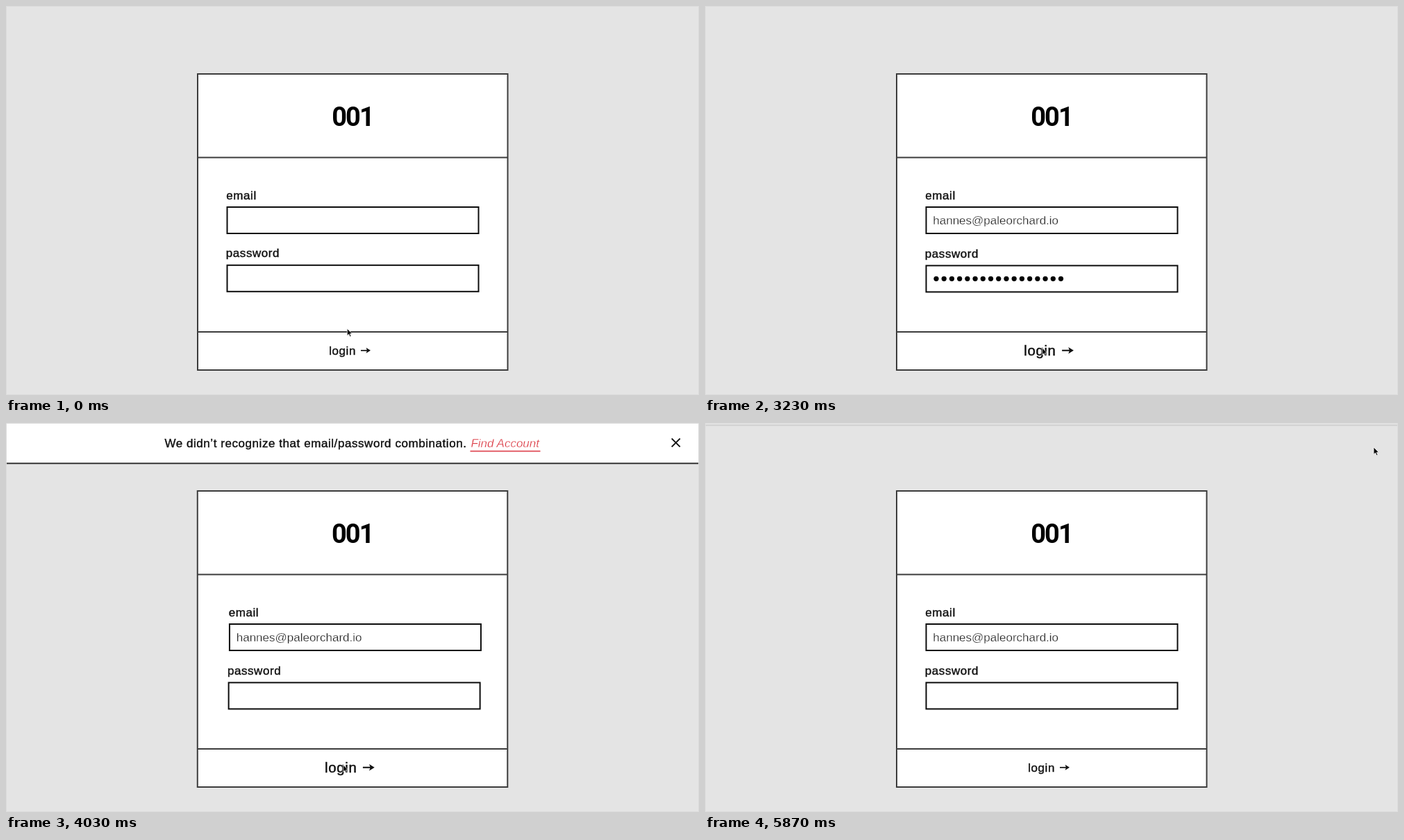
These frames come from a looping animation (998x561 px, 7.26 s). An HTML page:

```html
<!DOCTYPE html>
<html lang="en">
<head>
<meta charset="utf-8">
<title>Login form</title>
<style>
  html, body { margin: 0; width: 100%; height: 100%; overflow: hidden; background: #e4e4e4; }
  svg { display: block; width: 998px; height: 561px; }
  text { font: 17px 'Liberation Sans', Arial, sans-serif; white-space: pre; }
  .medium { fill: #111; stroke: #111; stroke-width: .4px; letter-spacing: .56px; }
  /* a white outline over the fill thins the letters */
  .light { fill: #222; stroke: #fff; stroke-width: .3px; }
  .link { fill: #dc3c46; font-style: italic; }
  .title { font: 700 38px Roboto, 'Liberation Sans', sans-serif; letter-spacing: -2px; }
  .card { fill: #fff; stroke: #3c3c3c; stroke-width: 2; }
  .field { fill: #fff; stroke: #0c0c0c; stroke-width: 2; }
</style>
</head>
<body>
<svg viewBox="0 0 998 561">
  <rect width="998" height="561" fill="#e4e4e4"/>

  <g id="card">
    <rect class="card" x="276" y="98" width="446.5" height="427"/>
    <path class="card" d="M276 218.4H722M276 469.9H722"/>
    <text class="title" x="469.3" y="172.7">001</text>
    <g id="login">
      <text class="medium" x="465.2" y="502.8">login</text>
      <path d="M511 496.8H521" stroke="#111" stroke-width="1.7"/>
      <path d="M518.6 492.8L525 496.8L518.6 500.8L520 496.8Z" fill="#111"/>
    </g>
  </g>

  <g id="email">
    <text class="medium" x="317.3" y="278.7">email</text>
    <rect class="field" x="318.5" y="290" width="362" height="38"/>
    <text id="address" class="light" x="328.3" y="315.4">hannes@paleorchard.io</text>
  </g>

  <g id="password">
    <text class="medium" x="316.8" y="362.9">password</text>
    <rect class="field" x="318.5" y="374.4" width="362" height="38"/>
    <g id="dots"></g>
  </g>

  <g id="banner">
    <rect y="-4" width="998" height="65" fill="#fff"/>
    <path d="M0 61.3H998" stroke="#333" stroke-width="2"/>
    <text class="medium" x="228.4" y="38.4">We didn’t recognize that email/password combination.</text>
    <text class="light link" x="669.4" y="38.4">Find Account</text>
    <path d="M668.5 43.6H769.5" stroke="#e04a54" stroke-width="1.6"/>
    <path d="M958.7 25.4l12 12m0-12l-12 12" stroke="#111" stroke-width="2"/>
  </g>

  <rect x=".5" y=".5" width="997" height="560" fill="none" stroke="#dcdcdc"/>
  <path id="cursor" d="M0 0V10.2L2.4 8L4.1 11.8L5.8 11L4.2 7.4L7.2 7.2Z" fill="#080808" stroke="#fff" stroke-width=".7"/>
</svg>

<script>
const LOOP = 7260;
const el = id => document.getElementById(id);
const [card, login, email, address, password, dots, banner, cursor] =
  ['card', 'login', 'email', 'address', 'password', 'dots', 'banner', 'cursor'].map(el);

for (let i = 0; i < 17; i++) {
  const dot = document.createElementNS('http://www.w3.org/2000/svg', 'circle');
  dot.setAttribute('cx', 333 + i * 11.22);
  dot.setAttribute('cy', 393.3);
  dot.setAttribute('r', 3.6);
  dots.append(dot);
}

// start, end, x, y of each pointer move
const moves = [
  [0, 730, 474, 316],
  [750, 900, 471.2, 315],
  [1580, 2000, 469.3, 394],
  [2810, 3220, 485.5, 493],
  [4152, 5466, 963, 35]
];

const ramp = (t, from, to) => Math.min(1, Math.max(0, (t - from) / (to - from)));
const smooth = u => u * u * u * (u * (6 * u - 15) + 10);
const ease = (t, from, to) => smooth(ramp(t, from, to));
const move = (node, x, y) => node.setAttribute('transform', `translate(${x} ${y})`);

function pointer(t) {
  let x = 491.3, y = 465.3;
  for (const [from, to, toX, toY] of moves) {
    const p = ease(t, from, to);
    x += (toX - x) * p;
    y += (toY - y) * p;
  }
  return [x, y];
}

// damped side-to-side wobble
function shake(t, start, size, decay) {
  const s = t - start;
  return s < 0 || s > 1700 ? 0 : size * Math.exp(-s / decay) * Math.sin(2 * Math.PI * s / 245);
}

// share of the banner that is out: a critically damped entry, a quick exit
function bannerShare(t) {
  if (t >= 5770) return (1 - Math.min(t - 5770, 100) / 160) ** 3;
  const s = Math.max(0, t - 3750) * .017;
  return 1 - (1 + s) * Math.exp(-s);
}

function draw(t) {
  move(cursor, ...pointer(t));
  move(card, shake(t, 3390, 10.9, 185), 0);
  move(email, shake(t, 3460, 23, 323), 0);
  move(password, shake(t, 3445, 37.8, 243), -.6 * (1 - ramp(t, 30, 300)));

  const scale = 1 + .2 * (ease(t, 3000, 3220) - ease(t, 4800, 5150));
  login.setAttribute('transform', `translate(495.3 497) scale(${scale}) translate(-495.3 -497)`);

  address.setAttribute('opacity', ramp(t, 1080, 1240));
  dots.setAttribute('opacity', ramp(t, 2210, 2370) - ramp(t, 3830, 3960));

  const share = bannerShare(t);
  move(banner, 0, 61.3 * (share - 1));
  banner.setAttribute('opacity', t < 3750 ? 0 : t < 5770 ? 1 : Math.min(1, 2 * share));
}

const begin = performance.now();
function tick() {
  draw((performance.now() - begin) % LOOP);
  requestAnimationFrame(tick);
}
tick();
</script>
</body>
</html>
```
